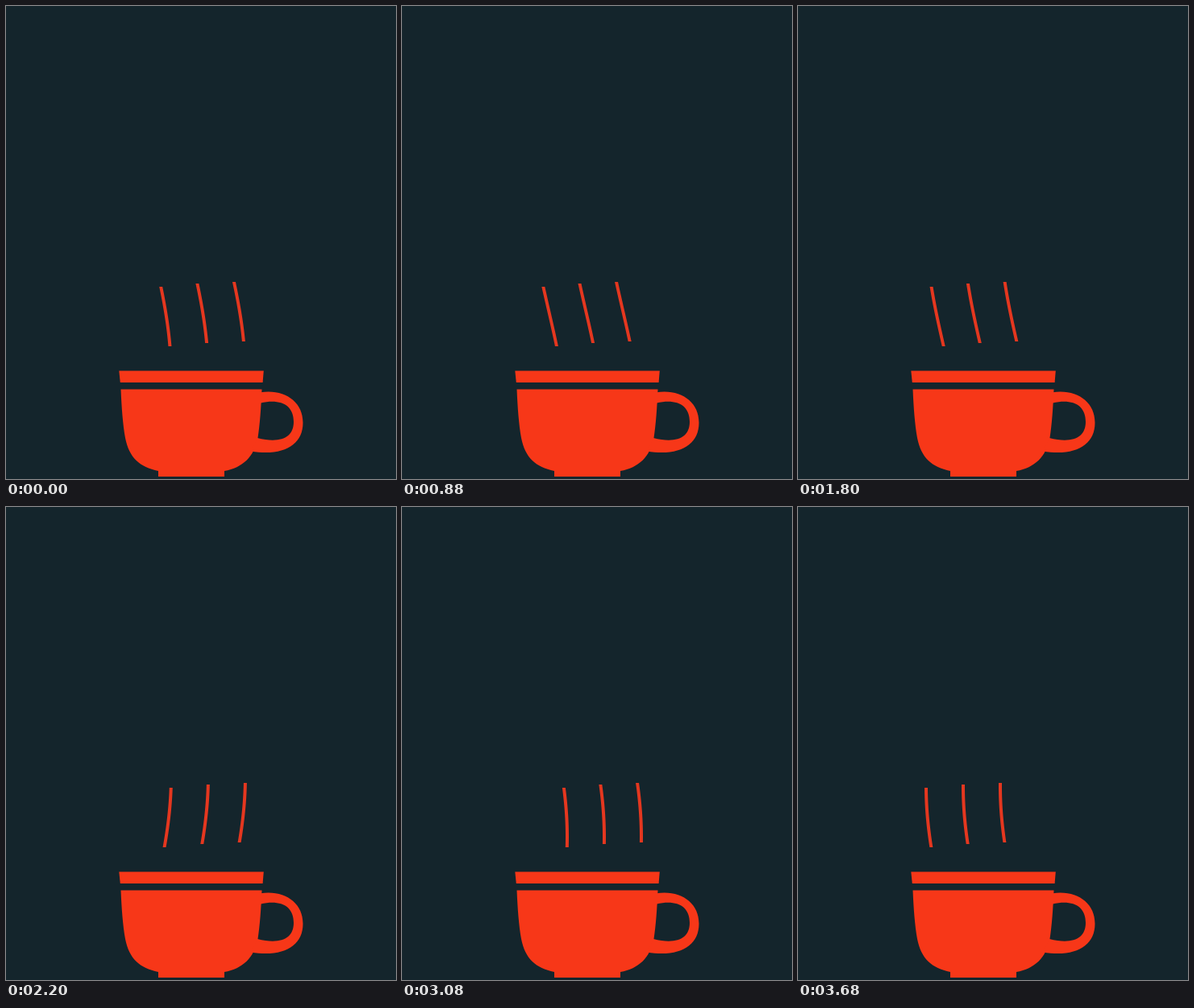
An HTML page with a canvas for the animation above (3.72 s loop, 484 px wide and 588 px high).

```html
<!DOCTYPE html>
<html lang="en">
<head>
<meta charset="utf-8">
<title>Steaming cup</title>
<style>
  html, body { margin: 0; width: 100%; height: 100%; overflow: hidden; background: #14252c; }
  canvas { display: block; }
</style>
</head>
<body>
<canvas id="stage" width="484" height="588"></canvas>
<script>
const ctx = document.getElementById('stage').getContext('2d');
const LOOP = 3720, STEP = 40, PERIOD = 1000;
const BACKGROUND = '#14252c', CUP = '#f73718', STEAM = '#e4371f';

const rim = new Path2D('M140.3 453.5H319.8L318.6 468H141.8Z');
const body = new Path2D(
  'M142.5 476.5H317.5C316.5 500 315 521 312.5 537C308 560 294 574 271 578' +
  'V585H189V578C166 573 153 562 148 537C145 520 143.5 500 142.5 476.5Z');
const handle = new Path2D(
  'M316 480.3C346 476 368.5 492 368.5 518C368.5 546 344 560 304 553.5L312 537' +
  'C340 544 357 537 357 517C357 496 341 488 316 493.5Z');

const strands = [{ x: 182, y: 349 }, { x: 228, y: 345 }, { x: 274, y: 343 }];
const STRAND_HEIGHT = 74, STRAND_WIDTH = 4, SWAY = 23;

// One wave travels up through all strands.
function sway(y, time) {
  return SWAY * Math.sin(2 * Math.PI * time / PERIOD + (y - 349) / 100 + 0.46);
}

function drawStrand({ x, y }, time) {
  const edge = (side, row) => ctx.lineTo(x + side * STRAND_WIDTH / 2 + sway(row, time), row);
  ctx.beginPath();
  for (let i = 0; i <= STRAND_HEIGHT; i += 2) edge(-1, y + i);
  for (let i = STRAND_HEIGHT; i >= 0; i -= 2) edge(1, y + i);
  ctx.fill();
}

function draw(now) {
  const time = Math.floor((now % LOOP) / STEP) * STEP;
  ctx.fillStyle = BACKGROUND;
  ctx.fillRect(0, 0, 484, 588);
  ctx.fillStyle = CUP;
  [rim, body, handle].forEach(shape => ctx.fill(shape));
  ctx.fillStyle = STEAM;
  strands.forEach(strand => drawStrand(strand, time));
}

let start;
function tick(now) {
  start ??= now;
  draw(now - start);
  requestAnimationFrame(tick);
}
draw(0);
requestAnimationFrame(tick);
</script>
</body>
</html>
```
